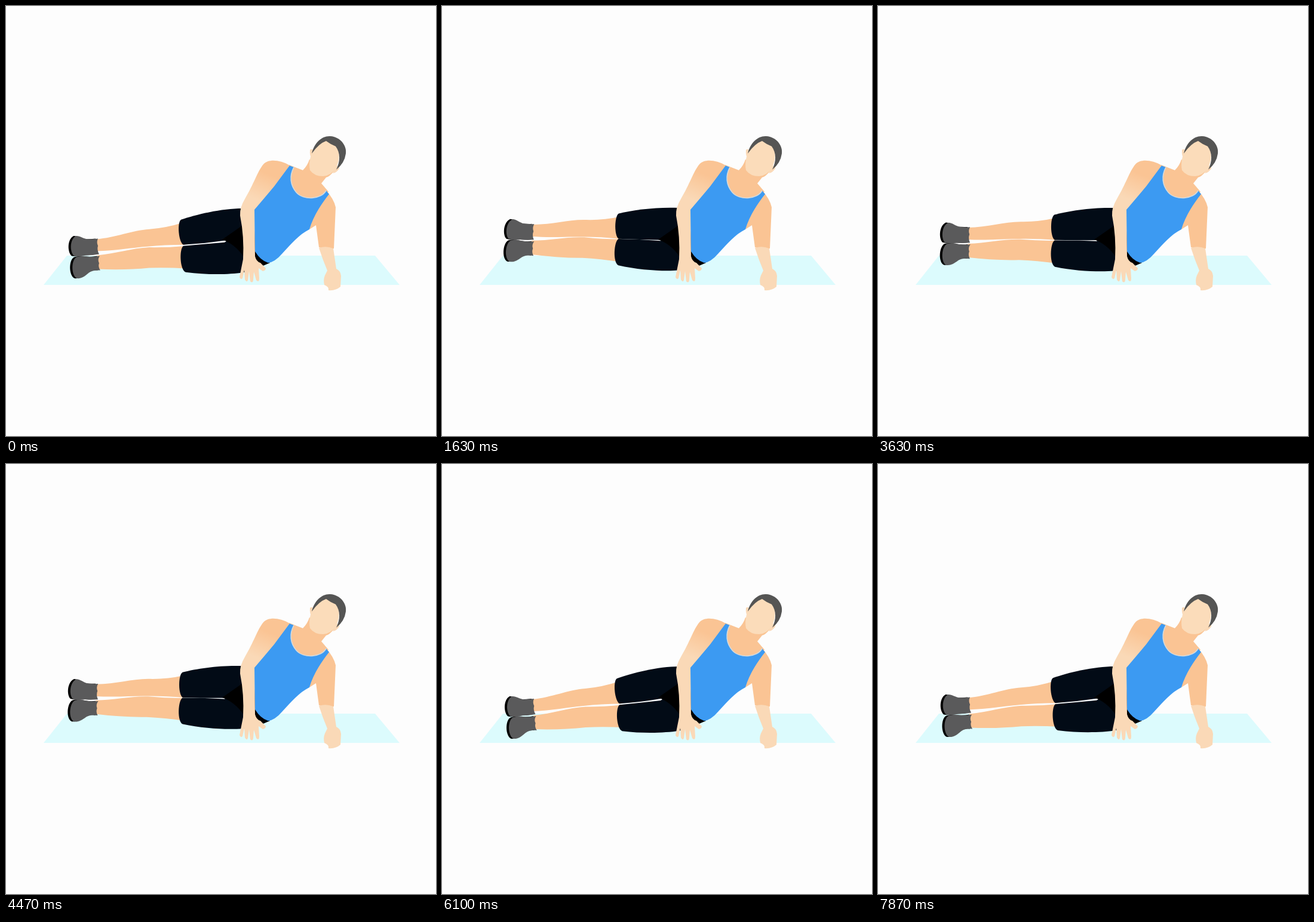
An HTML page with a canvas that plays this animation: 720x720 px, repeating every 8 s.

```html
<!DOCTYPE html>
<html lang="en">
<head>
<meta charset="utf-8">
<title>Side plank leg lift</title>
<style>
html, body { margin: 0; width: 100%; height: 100%; overflow: hidden; background: #fdfdfd; }
canvas { display: block; width: 720px; height: 720px; }
</style>
</head>
<body>
<canvas id="stage" width="720" height="720"></canvas>
<script>
const ctx = document.getElementById('stage').getContext('2d');
const LOOP = 8000, CYCLE = 1960, MOVE = 850, LIFT_AT = 340, DROP_AT = 1360;
const SWING = 14.5, REST = 0.05;
const HIP = { x: 398, y: 382 };
const SKIN = '#fac494', PALE = '#fad9b7', FACE = '#fbdcba', BLUE = '#3c9af2';
const HAIR = '#555554', SHOE = '#5a5a5b', SHORTS = '#020b16', BLACK = '#000';

const armTone = ctx.createLinearGradient(445, 268, 418, 335);
armTone.addColorStop(0.2, SKIN);
armTone.addColorStop(0.85, PALE);

const shape = d => new Path2D(d);
const mat = shape('M102 418H618L659 467H63Z');

const upperLeg = {
  shin: shape('M150 391C185 388 210 376 240 374Q268 372 296 363L300 400Q265 400 237 403C210 405 185 410 150 411Z'),
  shoe: shape('M117 385.5C124 385 129 390 137 391Q146 391 154 390Q151 396 154 402Q152 409 156 416Q144 418 134 418Q122 421 114 419C107 413 106 392 117 385.5Z')
};
const lowerLeg = {
  shin: shape('M153 418C185 415 210 406 240 404.5Q270 405 302 402L304 440Q270 438 240 439Q200 443 153 441Z'),
  shoe: shape('M118 421Q127 418 137 420Q147 421 157 419Q153 425 156 431Q154 437 158 443Q146 442 139 447C131 454 126 457 119 456.5C109 452 109 426 118 421Z')
};

const body = [
  [BLACK, 'M362 391Q378 380 395 368H425V425L398 420Q384 399 362 391Z'],
  [BLACK, 'M412 408L442 430L428 436L405 444Z'],
  [SKIN, 'M536 309Q549 323 552 337L549 406Q535 408 524 404L519 367L508 374L512 345Z'],
  [PALE, 'M524 405Q536 401 548 406L553 440Q560 443 561 452L560 470Q552 477 540 476Q541 470 533 467Q531 458 534 451L538 443Q530 424 524 405Z'],
  [SKIN, 'M474 266L497 275Q505 267 508 257L550 275Q542 286 536 287L528 297L540 311L526 326L490 324L472 290Z'],
  [BLUE, 'M474 267L482 270C474 285 476 300 486 312C498 326 528 324 536 309L541 315C530 329 515 350 508 374C490 383 478 398 463 414Q450 429 439 430Q426 426 417 411L415 341Q433 320 448 302Z'],
  [PALE, 'M509 241Q513 237 517 246L513 257Q508 251 509 241Z'],
  [PALE, 'M552 268Q559 266 558 272Q554 279 547 280Z'],
  [FACE, 'M516 238C508 252 507 265 509 275Q516 285 531 285Q544 284 552 272C560 258 560 238 549 231Q530 218 516 238Z'],
  [HAIR, 'M512 247C516 229 529 217 543 218C560 219 571 234 569 247Q567 263 553 274C560 260 560 246 552 235Q544 232 536 226Q524 230 512 247Z'],
  [armTone, 'M475 267C458 257 439 256 431 265C421 277 415 298 400 323Q391 338 392 351Q399 386 397 424L391 454Q393 459 396 456L399 442L400 458Q403 464 405 459L407 444L409 461Q413 465 414 459L415 445L419 459Q424 464 424 456L423 439L430 444Q435 443 435 439L426 430Q419 428 417 419L416 341Q434 320 449 302Z']
].map(([color, d]) => [color, shape(d)]);
const neckline = shape('M482 270C474 285 476 300 486 312C498 326 528 324 536 309');

function fill(color, path) {
  ctx.fillStyle = color;
  ctx.fill(path);
}

function trim(path) {
  ctx.strokeStyle = '#d3d9dc';
  ctx.lineWidth = 1.6;
  ctx.stroke(path);
}

// Equivalent to cubic-bezier(.25, .1, .25, 1)
function ease(x) {
  if (x <= 0) return 0;
  if (x >= 1) return 1;
  let lo = 0, hi = 1;
  const curve = (s, a, b) => 3 * (1 - s) ** 2 * s * a + 3 * (1 - s) * s * s * b + s ** 3;
  for (let i = 0; i < 24; i++) {
    const mid = (lo + hi) / 2;
    if (curve(mid, 0.25, 0.25) < x) lo = mid; else hi = mid;
  }
  return curve(lo, 0.1, 1);
}

function liftAt(time) {
  const t = time % CYCLE;
  if (t < LIFT_AT) return 1 - ease((t + CYCLE - DROP_AT) / MOVE);
  if (t < DROP_AT) return ease((t - LIFT_AT) / MOVE);
  return 1 - ease((t - DROP_AT) / MOVE);
}

const turn = (x, y, degrees) => new DOMMatrix().translate(x, y).rotate(degrees).translate(-x, -y);

function drawLeg(leg, m) {
  ctx.save();
  ctx.transform(m.a, m.b, m.c, m.d, m.e, m.f);
  fill(SKIN, leg.shin);
  ctx.translate(-4, 0);
  fill(BLACK, leg.shoe);
  ctx.translate(4, 0);
  fill(SHOE, leg.shoe);
  ctx.restore();
}

// Knee ends follow the leg while hip ends stay with the torso.
function drawThighs(upper, lower, lift) {
  const at = (m, x, y) => {
    const p = m.transformPoint(new DOMPoint(x, y));
    return [p.x, p.y];
  };
  const up = (x, y) => at(upper, x, y), low = (x, y) => at(lower, x, y);
  ctx.fillStyle = SHORTS;

  ctx.beginPath();
  ctx.moveTo(...low(297, 402));
  ctx.quadraticCurveTo(...low(332, 399), 366, 396 - 6 * lift);
  ctx.lineTo(400, 375);
  ctx.lineTo(424, 400);
  ctx.lineTo(430, 435 - 3 * lift);
  ctx.quadraticCurveTo(416, 442 - 4 * lift, 396, 447 - 10 * lift);
  ctx.bezierCurveTo(375, 450 - 12 * lift, ...low(338, 451), ...low(301, 446));
  ctx.bezierCurveTo(...low(291, 442), ...low(290, 407), ...low(297, 402));
  ctx.fill();

  ctx.beginPath();
  ctx.moveTo(...up(293, 358));
  ctx.bezierCurveTo(...up(318, 349), 362, 339 - 6 * lift, 397, 339 - 2 * lift);
  ctx.lineTo(405, 385);
  ctx.lineTo(366, 393 - 3 * lift);
  ctx.quadraticCurveTo(...up(332, 398), ...up(297, 400));
  ctx.bezierCurveTo(...up(289, 396), ...up(286, 363), ...up(293, 358));
  ctx.fill();
}

function draw(time) {
  const lift = liftAt(time);
  const upper = turn(HIP.x, HIP.y, (lift - REST) * SWING);
  const lower = upper.multiply(turn(130, 435, -1.2 * lift));
  ctx.fillStyle = '#fdfdfd';
  ctx.fillRect(0, 0, 720, 720);
  fill('#dcfbfd', mat);
  drawLeg(lowerLeg, lower);
  drawLeg(upperLeg, upper);
  drawThighs(upper, lower, lift);
  for (const [color, path] of body) {
    fill(color, path);
    if (color === BLUE) trim(neckline);
  }
}

const start = performance.now();
function tick() {
  draw((performance.now() - start) % LOOP);
  requestAnimationFrame(tick);
}
tick();
</script>
</body>
</html>
```
